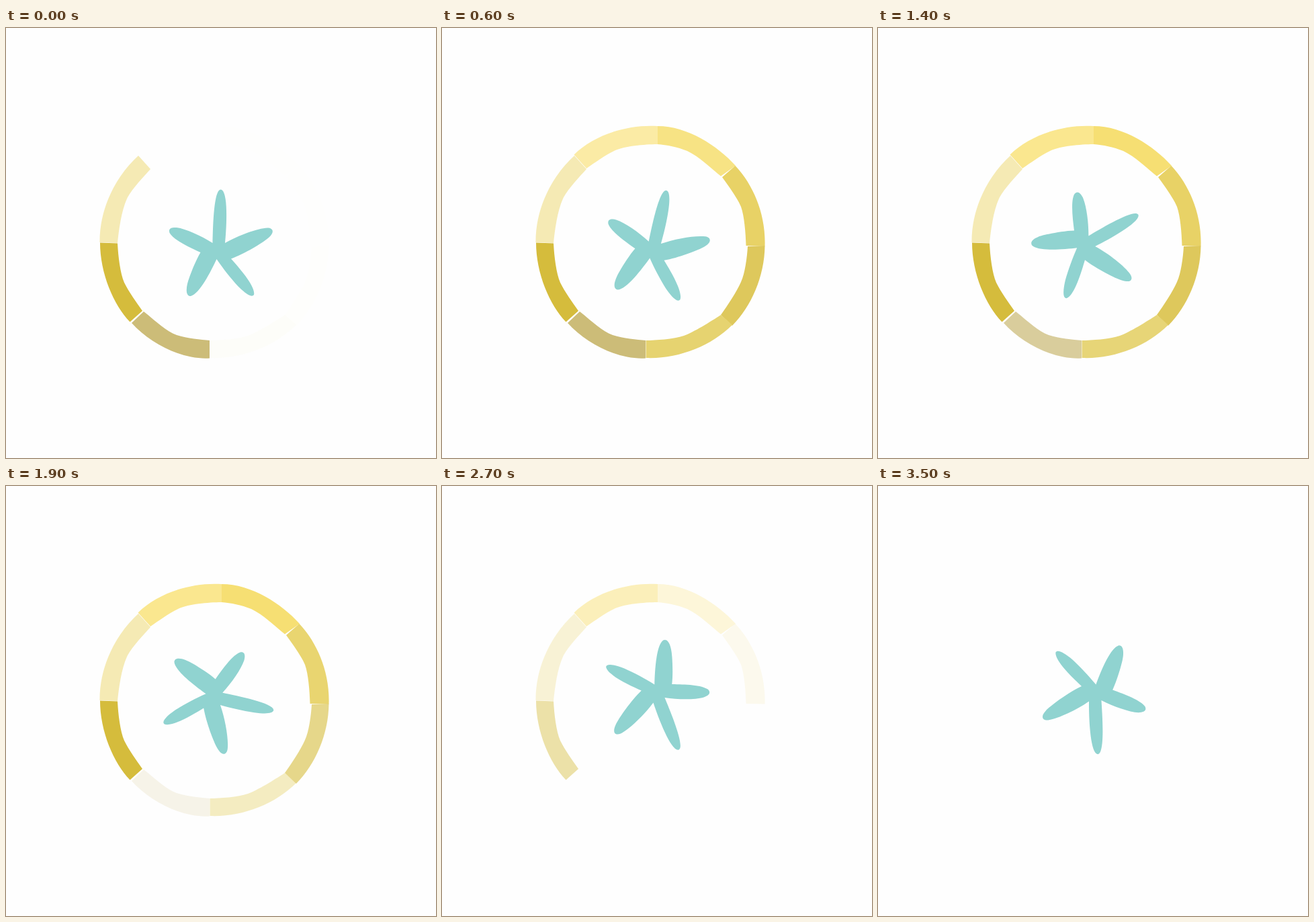
Animation, 640 px wide and 640 px high, one loop 3.6 s. Source, as an HTML page:

```html
<!DOCTYPE html>
<html lang="en">
<head>
<meta charset="utf-8">
<title>Starfish loader</title>
<style>
  html, body { margin: 0; height: 100%; overflow: hidden; background: #fefefe; }
  svg { display: block; width: 100vw; height: 100vh; }
</style>
</head>
<body>
<svg viewBox="0 0 640 640">
  <g id="ring"></g>
  <path id="star" fill="#90d3d0" d="M307.5 320C308 297 309 241 319.5 240.5C331 241 328.5 295 326 320
    C345 309 375 298 389 297.5C398 297.5 400 304 391 312C382 320 355 336 335 343.5
    C347 357 372 385 369 397C365 403 352 391 345 384C335 373 323 358 313.5 344
    C305 362 288 396 275 399C266 399 268 384 273 371C277 360 283 345 289.5 334
    C272 326 249 315 243.5 305C241 298 247 296.5 254 297C268 299 290 309 307.5 320Z"/>
</svg>
<script>
const LOOP = 3600, STEP = 100;
const ring = document.getElementById('ring');
const star = document.getElementById('star');

const clamp = x => Math.min(1, Math.max(0, x));
const sine = p => (1 - Math.cos(Math.PI * p)) / 2;
const quad = p => p * p;

// Solves cubic-bezier(.42, 0, .58, 1) by bisection.
function easeInOut(x) {
  let lo = 0, hi = 1;
  for (let i = 0; i < 24; i++) {
    const s = (lo + hi) / 2;
    const bx = 1.26 * s * (1 - s) ** 2 + 1.74 * s * s * (1 - s) + s ** 3;
    if (bx < x) lo = s; else hi = s;
  }
  return lo * lo * (3 - 2 * lo);
}

// fadeIn and fadeOut hold start and end times in ms.
const segments = [
  { color: '#ccbc78', fadeOut: [940, 2240], ease: sine,
    d: 'M205 422C225 438 238 451 254 457C270 462 290 464 303 465L303 491.5C262 494 215 470 187 439Z' },
  { color: '#d5bc3c', fadeOut: [1820, 3000], ease: quad,
    d: 'M140 319.5L166 320.5C167 340 170 365 176 379C183 393 194 408 203 421L184.5 437.5C160 412 140 365 140 319.5Z' },
  { color: '#f5eab4', fadeOut: [2080, 3000], ease: quad,
    d: 'M139.5 319L166 320C168 300 172 270 181 252C188 239 205 221 215 210L197 190C162 222 139 270 139.5 319Z' },
  { color: '#fae78f', fadeIn: [0, 850], fadeOut: [2200, 3000], ease: quad,
    d: 'M196.5 188.5C225 160 275 143 321 146L321 173C300 173 272 176 258 182C243 189 228 200 215 209Z' },
  { color: '#f6df73', fadeIn: [-30, 790], fadeOut: [1990, 3080], ease: sine,
    d: 'M321 146C365 146 410 175 437 205L415 220.5C401 209 382 191 365 183C350 177 335 174 321 173Z' },
  { color: '#e8d266', fadeIn: [-35, 600], fadeOut: [1680, 2980], ease: sine,
    d: 'M436.5 205C465 235 482 280 480.5 324.5L452.5 324C452 305 450 280 445 266C439 252 427 236 417 222Z' },
  { color: '#dec85c', fadeIn: [-45, 570], fadeOut: [1430, 2730], ease: sine,
    d: 'M480.5 324C480 370 460 415 432 443L415 427C425 413 439 392 445 378C451 365 454 342 455 325Z' },
  { color: '#e6d370', fadeIn: [-75, 540], fadeOut: [1220, 2470], ease: sine,
    d: 'M432 442C400 474 350 493 303.5 491L303.5 465C318 465 345 463 360 458C374 453 400 437 415 427Z' }
];

for (const seg of segments) {
  seg.path = document.createElementNS('http://www.w3.org/2000/svg', 'path');
  seg.path.setAttribute('d', seg.d);
  seg.path.setAttribute('fill', seg.color);
  ring.append(seg.path);
}

const progress = (t, [from, to]) => clamp((t - from) / (to - from));

function draw(now) {
  const t = Math.floor(now % LOOP / STEP) * STEP;
  for (const { path, fadeIn, fadeOut, ease } of segments) {
    const shown = fadeIn ? sine(progress(t, fadeIn)) : 1;
    path.setAttribute('opacity', shown * (1 - ease(progress(t, fadeOut))));
  }
  const angle = 175 * easeInOut(clamp(t / 3500));
  star.setAttribute('transform', `rotate(${angle} 320 320)`);
}

const start = performance.now();
function tick() {
  draw(performance.now() - start);
  requestAnimationFrame(tick);
}
tick();
</script>
</body>
</html>
```
